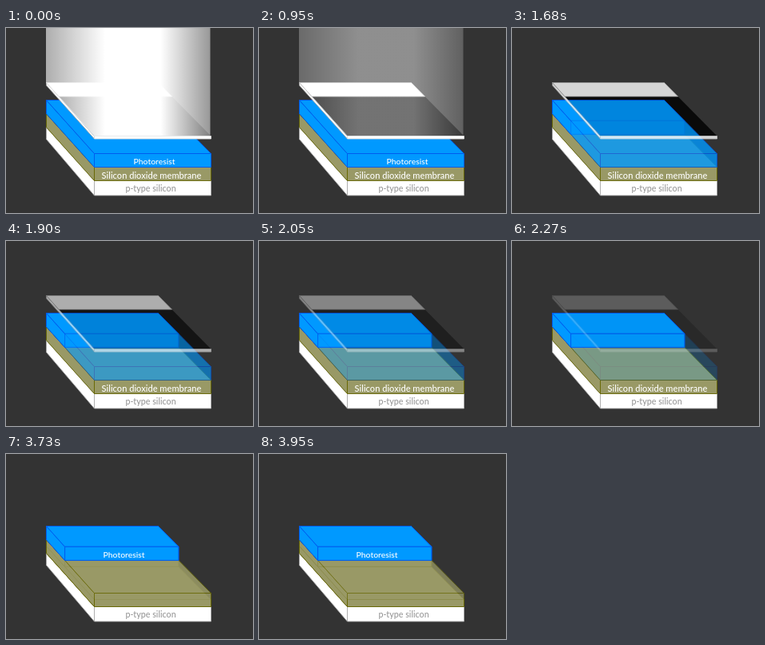
An HTML page that plays this animation: 309x232 px, repeating every 4090 ms.

```html
<!DOCTYPE html>
<html lang="en">
<head>
<meta charset="utf-8">
<title>Photoresist exposure</title>
<style>
  html, body { margin: 0; width: 100%; height: 100%; overflow: hidden; background: #333; }
  svg { display: block; width: 100%; height: 100%; }
  text { font-family: Lato, "Open Sans", sans-serif; font-weight: 500; text-anchor: middle; }
  path { stroke-width: .9; stroke-linejoin: round; }
</style>
</head>
<body>
<svg viewBox="0 0 309 232" xmlns="http://www.w3.org/2000/svg">
  <defs>
    <linearGradient id="light" gradientUnits="userSpaceOnUse" x1="50" y1="0" x2="255" y2="0">
      <stop offset="0" stop-color="#fff" stop-opacity=".6"/>
      <stop offset=".36" stop-color="#fff"/>
      <stop offset=".7" stop-color="#fff"/>
      <stop offset="1" stop-color="#fff" stop-opacity=".5"/>
    </linearGradient>
  </defs>
  <g id="scene"></g>
</svg>
<script>
(() => {
  const LOOP = 4090;
  const STEP = 0.385;  // depth of the resist that stays
  const SHADE = 0.26;  // depth where the opaque part of the mask begins
  const RESIST = ['#09f', '#0058ee'];
  const OXIDE = ['#996', '#660'];
  const SILICON = ['#fff', '#aaa'];
  const MASK = ['#fff', '#aaa'];

  // Corners of a layer at depth t: 0 is the back edge, 1 the front edge
  const left = (t, y) => [50.5 + 60 * t, y + 67 * t];
  const right = (t, y) => [190.5 + 66 * t, y + 67 * t];

  const poly = (points, [fill, stroke]) =>
    `<path d="M${points.map(p => p.join()).join('L')}Z" fill="${fill}" stroke="${stroke}"/>`;
  const lid = (a, b, y, paint) =>
    poly([left(a, y), right(a, y), right(b, y), left(b, y)], paint);
  const front = (t, y, h, paint) =>
    poly([left(t, y), right(t, y), right(t, y + h), left(t, y + h)], paint);
  const side = (a, b, y, h, paint, backH = h) =>
    poly([left(a, y), left(b, y), left(b, y + h), left(a, y + backH)], paint);
  const slab = (a, b, y, h, paint, backH) =>
    side(a, b, y, h, paint, backH) + lid(a, b, y, paint) + front(b, y, h, paint);

  const fade = (alpha, body) => alpha > 0 ? `<g opacity="${alpha}">${body}</g>` : '';
  const label = (x, y, size, text, fill = '#fff') =>
    `<text x="${x}" y="${y}" font-size="${size}" fill="${fill}">${text}</text>`;

  const resist = depth => slab(0, depth, 90.5, 17, RESIST);
  const shade = () => lid(SHADE, 1, 68.5, ['#000', 'none']);
  const frame = () => side(0, 1, 68.5, 3.5, MASK) + lid(0, SHADE, 68.5, MASK) +
    front(1, 68.5, 3.5, ['#fff', '#ddd']);
  const beam = () =>
    '<path d="M50 0H255.500V135.500H110.500L50 69Z" fill="url(#light)"/>';

  // Value of the last [time, value] pair reached
  const at = (t, keys) => keys.reduce((v, [from, next]) => t >= from ? next : v, keys[0][1]);

  function oxide(alpha) {
    if (alpha === 1) return slab(0, 1, 107.5, 17, OXIDE);
    return slab(0, 1, 115.5, 9, OXIDE) + slab(0, STEP, 107.5, 8, OXIDE) +
      fade(alpha, slab(0, 1, 107.5, 17, OXIDE));
  }

  function draw(t) {
    const lit = at(t, [[0, 1], [950, .45], [1090, 0]]);
    const exposed = at(t, [[0, 1], [1680, .8], [1900, .6], [2050, .4], [2270, .2], [2460, 0]]);
    const etched = at(t, [[0, 1], [3730, .88], [3950, .75]]);

    let out = slab(0, 1, 124.5, 18.5, SILICON, 15) + oxide(etched);
    if (exposed === 1) {
      out += resist(1) + shade() + frame() + fade(lit, beam());
    } else {
      out += resist(STEP) + fade(exposed, shade()) + fade(exposed, resist(1)) +
        fade(1 - exposed, resist(STEP)) + fade(exposed, frame());
    }
    if (t < 1450) out += label(185.5, 170.5, 10.4, 'Photoresist');
    if (t >= 2460) out += label(147.5, 129.5, 10.4, 'Photoresist');
    if (t < 3730) out += label(182, 188.8, 11.1, 'Silicon dioxide membrane');
    return out + label(181, 204.5, 10.7, 'p-type silicon', '#999');
  }

  const scene = document.getElementById('scene');
  const began = performance.now();
  let shown = '';

  function tick() {
    const next = draw((performance.now() - began) % LOOP);
    if (next !== shown) scene.innerHTML = shown = next;
    requestAnimationFrame(tick);
  }
  tick();
})();
</script>
</body>
</html>
```
